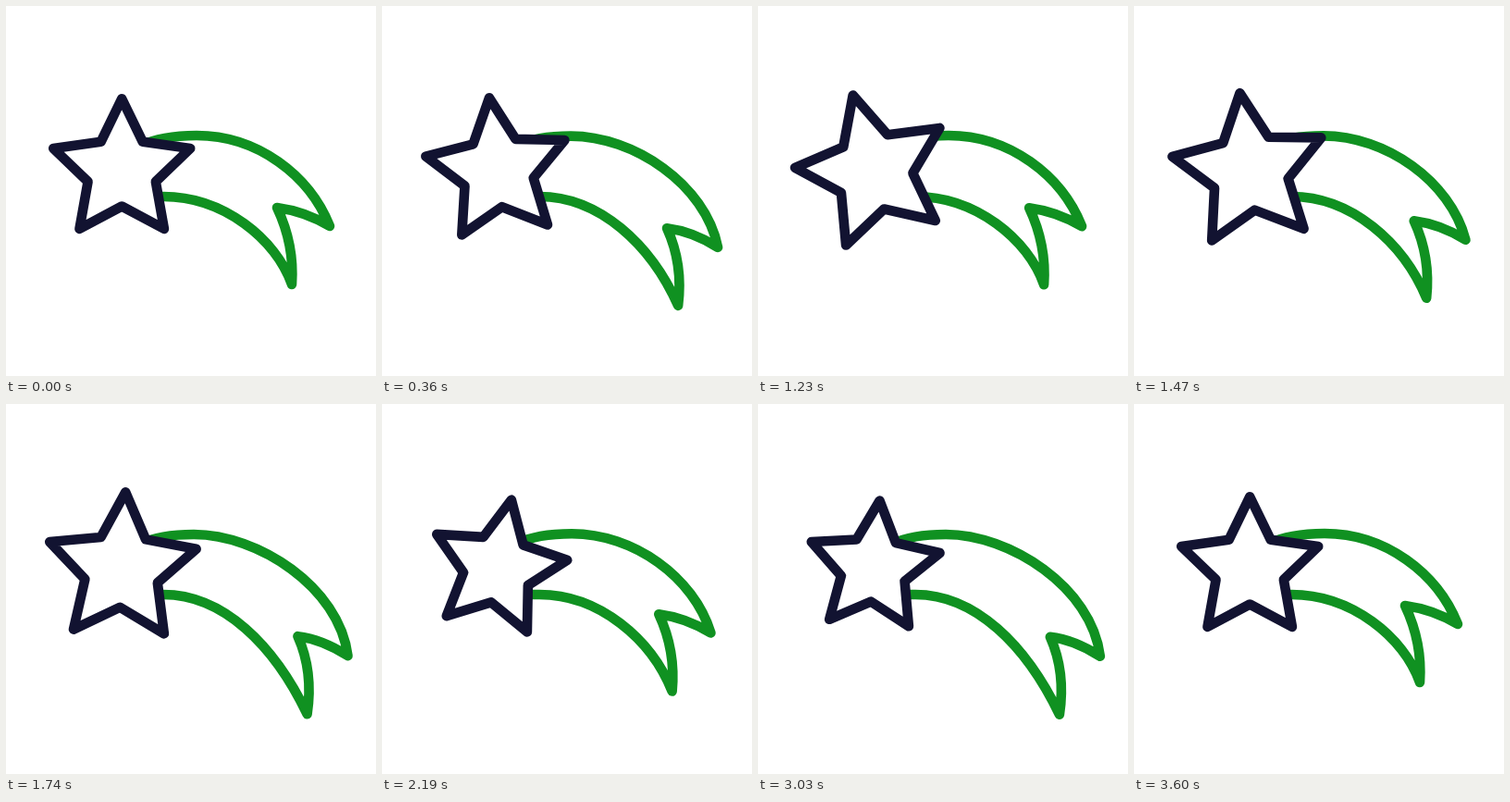
Animation, 400 px wide and 400 px high, one loop 5.63 s. Source, as an HTML page with a canvas:

```html
<!DOCTYPE html>
<html lang="en">
<head>
<meta charset="utf-8">
<title>Shooting star</title>
<style>
  html, body { margin: 0; width: 100%; height: 100%; overflow: hidden; background: #fff; }
  canvas { display: block; width: 400px; height: 400px; }
</style>
</head>
<body>
<canvas id="stage" width="400" height="400"></canvas>
<script>
const ctx = document.getElementById('stage').getContext('2d');
const LOOP = 5630, ACTIVE = 3600, STEP = 30, SWAY = 1200;
const NAVY = '#121331', GREEN = '#109121';

const ease = u => {
  u = Math.min(1, Math.max(0, u));
  return u * u * (3 - 2 * u);
};

// Eased progress between two times
const ramp = (t, from, to) => ease((t - from) / (to - from));

// The star leans back, swings forward and settles
const spin = t => -20 * ramp(t, 0, 930) + 31.2 * ramp(t, 930, 2160) - 11.2 * ramp(t, 2370, ACTIVE);

// It grows, shrinks below its resting size and recovers
const size = t => 1 + 0.096 * ramp(t, 0, 1200) - 0.188 * ramp(t, 1480, 2640) + 0.092 * ramp(t, 2640, ACTIVE);

// The tail stretches and returns once per sway
const stretch = t => (1 - Math.cos(2 * Math.PI * t / SWAY)) / 2;

function stroke(color) {
  ctx.strokeStyle = color;
  ctx.lineWidth = 10.6;
  ctx.stroke();
}

function drawTail(k) {
  // A point and how far it travels at full stretch
  const at = (x, y, dx = 0, dy = 0) => [x + dx * k, y + dy * k];
  ctx.beginPath();
  ctx.moveTo(146, 151);
  ctx.bezierCurveTo(162, 143, ...at(184, 140, -2, 1), ...at(206, 140, -3, 1));
  ctx.bezierCurveTo(...at(272, 140, 0, 1), ...at(328, 183, 33, 15), ...at(350, 238, 20, 35));
  ctx.quadraticCurveTo(...at(323, 222, 19, 33), ...at(293, 218, 23, 34));
  ctx.quadraticCurveTo(...at(312, 258, 21, 32), ...at(309, 301, 17, 35));
  ctx.bezierCurveTo(...at(292, 252, -2, 9), 235, 206, 170, 206);
  ctx.lineTo(150, 206);
  stroke(GREEN);
}

function drawStar(angle, scale) {
  ctx.save();
  ctx.translate(125.2, 170 + 8 * scale);
  ctx.rotate(angle * Math.PI / 180);
  ctx.beginPath();
  for (let i = 0; i < 10; i++) {
    const a = i * Math.PI / 5, r = scale * (i % 2 ? 38.5 : 77.8);
    ctx.lineTo(r * Math.sin(a), -r * Math.cos(a));
  }
  ctx.closePath();
  ctx.fillStyle = '#fff';
  ctx.fill();
  stroke(NAVY);
  ctx.restore();
}

function render(ms) {
  const t = Math.min(ACTIVE, Math.floor(ms % LOOP / STEP) * STEP);
  ctx.fillStyle = '#fff';
  ctx.fillRect(0, 0, 400, 400);
  ctx.lineJoin = ctx.lineCap = 'round';
  drawTail(stretch(t));
  drawStar(spin(t), size(t));
}

const start = performance.now();
function tick() {
  render(performance.now() - start);
  requestAnimationFrame(tick);
}
tick();
</script>
</body>
</html>
```
